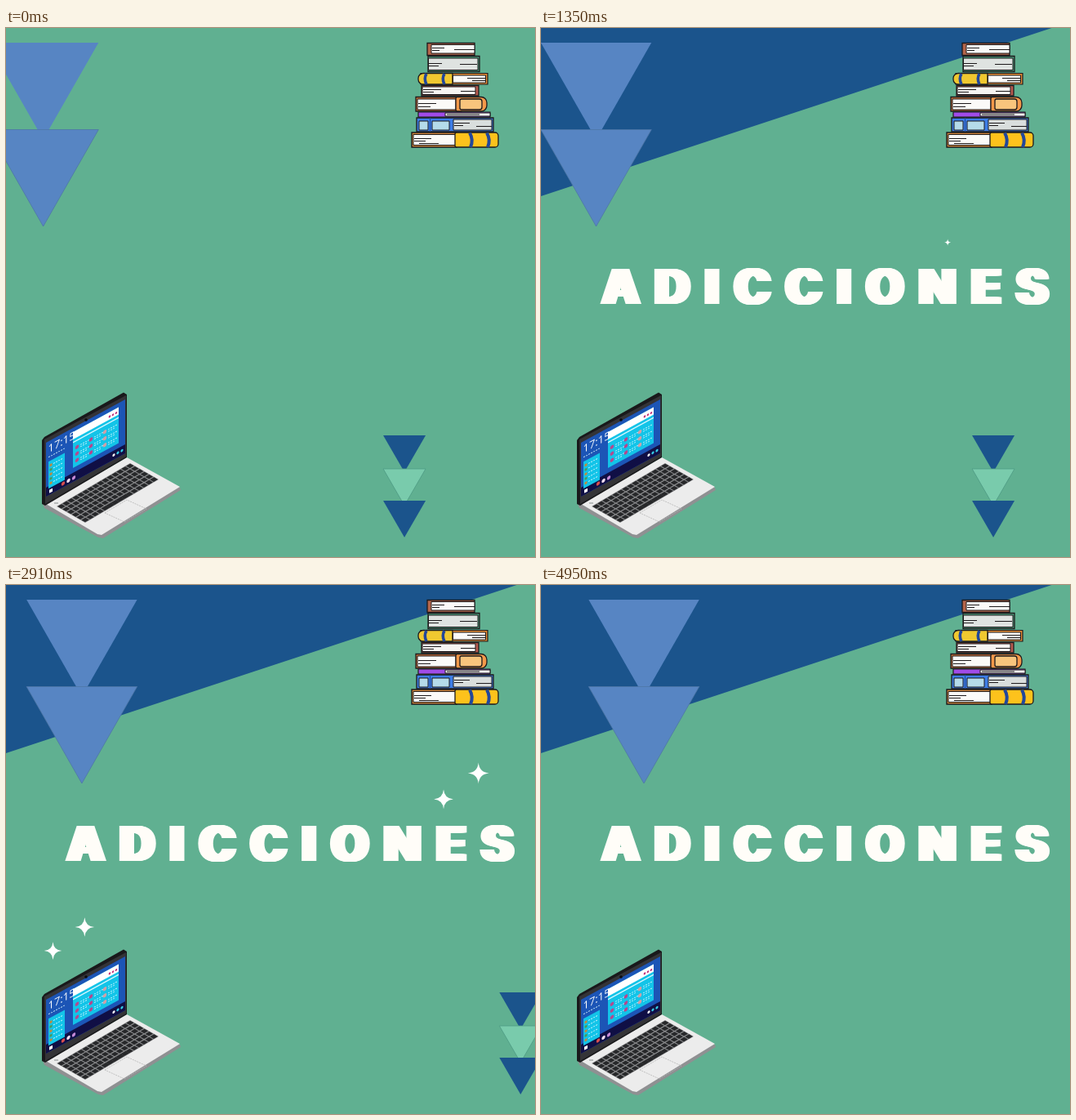
An HTML page with a canvas that plays this animation: 648 by 648 pixels, repeating every 4.98 s.

```html
<!DOCTYPE html>
<html lang="es">
<head>
<meta charset="utf-8">
<title>Adicciones</title>
<style>
html, body { margin: 0; width: 100%; height: 100%; overflow: hidden; background: #60b091; }
canvas { display: block; width: 648px; height: 648px; }
</style>
</head>
<body>
<canvas id="stage" width="648" height="648"></canvas>
<script>
const ctx = document.getElementById('stage').getContext('2d');
const LOOP = 4980, TWINKLE = LOOP / 4;
const INK = '#1d1a1c', NAVY = '#1b548c';

function poly(fill, pts, stroke, width = 1) {
  ctx.beginPath();
  for (let i = 0; i < pts.length; i += 2) ctx.lineTo(pts[i], pts[i + 1]);
  ctx.closePath();
  if (fill) { ctx.fillStyle = fill; ctx.fill(); }
  if (stroke) { ctx.strokeStyle = stroke; ctx.lineWidth = width; ctx.stroke(); }
}

function box(fill, x, y, w, h, stroke, width = 1) {
  poly(fill, [x, y, x + w, y, x + w, y + h, x, y + h], stroke, width);
}

function roundBox(fill, x, y, w, h, radii) {
  ctx.beginPath();
  ctx.roundRect(x, y, w, h, radii);
  ctx.fillStyle = fill;
  ctx.fill();
  ctx.strokeStyle = INK;
  ctx.lineWidth = 1.3;
  ctx.stroke();
}

function dot(fill, x, y, r) {
  ctx.beginPath();
  ctx.arc(x, y, r, 0, 7);
  ctx.fillStyle = fill;
  ctx.fill();
}

function rule(x1, x2, y, color = INK, width = 1) {
  ctx.fillStyle = color;
  ctx.fillRect(x1, y, x2 - x1, width);
}

function triangle(fill, x, top, half, height, stroke) {
  poly(fill, [x - half, top, x + half, top, x, top + height], stroke, 0.8);
}

// Progress of an ease-out entrance
function enter(t, start, length) {
  const p = Math.min(1, Math.max(0, (t - start) / length));
  return { rest: (1 - p) ** 3, alpha: Math.min(1, p * 4) };
}

function corner(t) {
  const e = enter(t, 10, 500);
  ctx.save();
  ctx.globalAlpha = e.alpha;
  ctx.translate(0, 29 * e.rest);
  poly(NAVY, [0, -40, 747, -40, 0, 206]);
  ctx.restore();
}

function title(t) {
  const e = enter(t, 520, 500);
  if (!e.alpha) return;
  ctx.save();
  ctx.globalAlpha = e.alpha;
  ctx.fillStyle = '#fffdf8';
  ctx.font = '800 59px Inter, "Open Sans", sans-serif';
  ctx.letterSpacing = '19px';
  // Repeated strikes give the stems a heavy, extended look
  for (let dx = -4; dx <= 4; dx++) ctx.fillText('ADICCIONES', 75 + dx, 337.5 + 29 * e.rest);
  ctx.restore();
}

function star(x, y, r) {
  if (r < 0.8) return;
  const k = r * 0.08;
  ctx.beginPath();
  ctx.moveTo(x, y - r);
  ctx.quadraticCurveTo(x + k, y - k, x + r, y);
  ctx.quadraticCurveTo(x + k, y + k, x, y + r);
  ctx.quadraticCurveTo(x - k, y + k, x - r, y);
  ctx.quadraticCurveTo(x - k, y - k, x, y - r);
  ctx.fillStyle = '#fff';
  ctx.fill();
}

function pulse(t, start, end) {
  const half = (end - start) / 2;
  return Math.max(0, 1 - Math.abs(t % TWINKLE - start - half) / half);
}

function sparkles(t, x, y, s) {
  star(x, y, 38 * s * pulse(t, 303, 993));
  star(x - 42.7 * s, y + 32 * s, 19 * s * pulse(t, 48, 591));
  star(x - 51.7 * s, y - 40.5 * s, 14 * s * pulse(t, 615, 1185));
}

function books() {
  // top
  box('#b4654a', 516, 18.5, 58, 15, INK, 1.3);
  box('#fbfaf8', 521, 20.5, 53, 10.5, INK);
  rule(522, 537, 24); rule(522, 531, 27); rule(549, 574, 26);
  // grey
  box('#4c9b7b', 517, 34.5, 63, 19, INK, 1.3);
  box('#dfe3e1', 517.5, 37, 60.5, 14.5, INK);
  rule(518, 534, 43); rule(518, 530, 46); rule(556, 577, 44);
  // yellow with bands
  box('#e28a35', 508, 55.5, 82, 13.5, INK, 1.2);
  roundBox('#f0c830', 505, 55.5, 42, 13.5, [6, 0, 0, 6]);
  for (const x of [513, 535]) {
    ctx.beginPath();
    ctx.moveTo(x + 2, 56);
    ctx.quadraticCurveTo(x - 1.5, 62, x + 2, 69);
    ctx.strokeStyle = '#23479a';
    ctx.lineWidth = 3.5;
    ctx.stroke();
  }
  box('#fbfaf8', 547.5, 58, 40, 9, INK);
  rule(565, 587, 61); rule(571, 587, 64);
  // red
  box('#b65a4e', 509, 70.5, 70, 12.5, INK, 1.3);
  box('#f6f4f2', 510, 72, 65, 9.5, INK);
  rule(511, 533, 75); rule(511, 524, 78); rule(557, 575, 77);
  // orange
  box('#c9713a', 502, 84.5, 56, 17.5, INK, 1.3);
  box('#fbfaf8', 504, 87, 47, 13, INK);
  rule(505, 527, 92); rule(505, 520, 96);
  roundBox('#f4994a', 551, 84.5, 38, 17.5, [2, 7, 7, 2]);
  roundBox('#f8c57d', 556, 87, 27, 13, [2, 3, 3, 2]);
  // purple
  box('#a04be8', 505, 103, 88, 6, INK, 1.2);
  box('#f4f2f4', 538, 104, 55, 4, INK);
  rule(540, 580, 105.5);
  // blue
  box('#3d7de6', 503, 110, 94, 17, INK, 1.3);
  box('#d9dedd', 548, 112, 47, 13, INK);
  rule(549, 568, 116); rule(549, 560, 119); rule(576, 595, 120);
  box('#b5dbea', 506, 114, 11, 11, INK);
  box('#b5dbea', 522, 114, 21, 11, INK);
  rule(519, 520, 110, '#214b9c', 17);
  // bottom
  box('#d98a3d', 497, 128, 55, 18, INK, 1.4);
  box('#fbfaf8', 499, 130.5, 52, 13, INK);
  rule(500, 521, 135); rule(500, 514, 138); rule(506, 530, 141);
  roundBox('#fdc21c', 550, 128, 53, 18, [2, 4, 4, 2]);
  for (const x of [569, 590]) {
    ctx.beginPath();
    ctx.moveTo(x - 1, 128.5);
    ctx.quadraticCurveTo(x + 4, 137, x, 146);
    ctx.strokeStyle = '#23479a';
    ctx.lineWidth = 4;
    ctx.stroke();
  }
}

function dashes(x, y, w) {
  for (let i = 0; i < w; i += 3) rule(x + i, x + i + 2, y, '#d9f8ff', 0.8);
}

function screen() {
  ctx.save();
  ctx.transform(1, -0.546, 0, 1, 49, 508);
  box('#1c55b6', 0, 0, 97, 66);
  box('#100f45', 0, 55, 97, 11);
  ctx.fillStyle = '#fff';
  ctx.font = '13px "Open Sans", Lato, sans-serif';
  ctx.fillText('17:15', 2.5, 14);
  dashes(3, 19, 20);
  box('#13c4e8', 33, 5, 56, 44);
  box('#fff', 33, 5, 56, 9);
  rule(33, 89, 17, '#d9f8ff', 1.5);
  for (let i = 0; i < 3; i++) {
    dot('#c2307a', 78 + i * 4, 10.5, 1.3);
    for (let j = 0; j < 3; j++) {
      const x = 38 + i * 17, y = 26 + j * 8;
      dot(i < 2 ? '#b4488e' : '#cfa0a8', x, y, 2.3);
      dashes(x + 4, y - 1, 10);
      dashes(x + 4, y + 1.4, 8);
    }
    dot(['#d94f4f', '#f2dff0', '#c58ad8'][i], 21 + i * 6.5, 61.5, 2.2);
    dot(['#fff', '#35cfe8', '#35cfe8'][i], 83 + i * 5, 60.5, 1.6);
  }
  box('#13c4e8', 3, 25, 20, 33);
  for (let i = 0; i < 5; i++) {
    box(i % 2 ? '#4a9a5c' : '#c08a3c', 4.5, 29 + i * 5.5, 3, 3);
    dashes(9, 30 + i * 5.5, 12);
  }
  box('#fff', 4, 60, 4, 4);
  ctx.restore();
}

function laptop() {
  poly('#8f9092', [45, 583, 148, 528, 213, 563, 214, 566, 119, 625, 113, 624, 47, 588]);
  poly('#ececec', [49, 583, 148, 526, 213, 562, 117, 621, 112, 620]);
  poly('#19191b', [44, 505, 47, 501, 144, 446.5, 148, 449, 148, 526, 48, 585, 44, 583]);
  poly('#343437', [47, 504, 147, 450, 147, 525, 48, 583]);
  screen();
  dot('#0c0c0e', 98, 480, 1.8);
  rule(59, 64, 581, '#b9bcbc', 2);

  ctx.save();
  ctx.transform(90, -53, 35, 20, 62, 586);
  box('#8b8c8e', 0, 0, 1, 1);
  for (let r = 0; r < 6; r++) {
    for (let c = 0; c < 15; c++) {
      const wide = r === 5 && c > 3 && c < 9;
      box('#27282a', c / 15 + 0.006, r / 6 + 0.018, wide ? 0.068 : 0.055, 0.132);
    }
  }
  ctx.restore();

  ctx.setLineDash([2, 1]);
  poly(null, [121, 594, 148, 578, 172, 589, 145, 605], '#b5b5b5', 0.8);
  ctx.setLineDash([]);
}

function draw(t) {
  ctx.fillStyle = '#60b091';
  ctx.fillRect(0, 0, 648, 648);
  corner(t);

  const left = 45.6 + 0.01625 * t;
  triangle('#5785c3', left, 18, 67.7, 118.5);
  triangle('#5785c3', left, 124.5, 67.7, 118.5, '#4f77a6');

  const right = 488 + 0.0489 * t;
  triangle(NAVY, right, 499, 26, 45);
  triangle('#79cbac', right, 540, 26, 45, '#4d9a83');
  triangle(NAVY, right, 579, 26, 45);

  title(t);
  books();
  laptop();
  sparkles(t, 508 + 0.0243 * t, 230.5, 1);
  sparkles(t, -23 + 0.041 * t, 419, 0.91);
}

const start = performance.now();
function frame(now) {
  draw(Math.max(0, now - start) % LOOP);
  requestAnimationFrame(frame);
}
draw(0);
requestAnimationFrame(frame);
</script>
</body>
</html>
```
